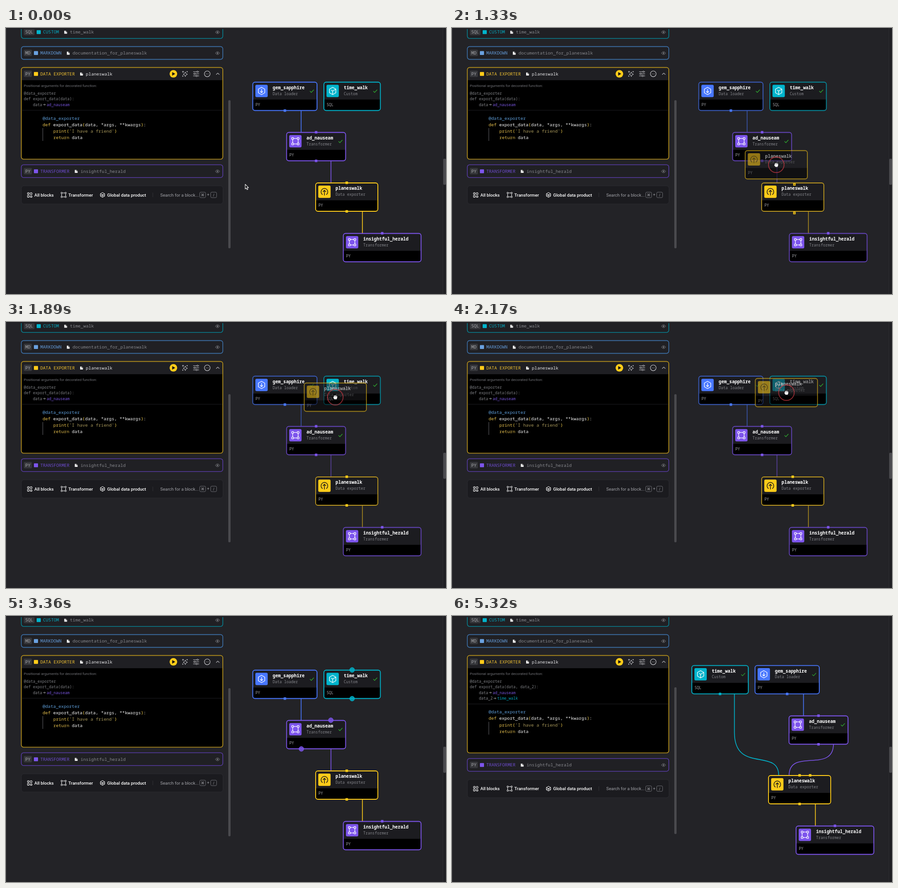
These frames come from a looping animation (962 px wide and 582 px high, 5.53 s). An HTML page with a canvas:

```html
<!DOCTYPE html>
<html lang="en">
<head>
<meta charset="utf-8">
<title>Pipeline editor</title>
<style>
html, body { margin: 0; width: 100%; height: 100%; overflow: hidden; background: #232327; }
canvas { display: block; width: 962px; height: 582px; }
</style>
</head>
<body>
<canvas id="stage" width="962" height="582"></canvas>
<script>
const ctx = document.getElementById('stage').getContext('2d');
const LOOP = 5530, STEP = 70;
const HOVER = 630, DRAG = 1190, DROP = 2520, RELAYOUT = 3570;
const MONO = '"Noto Sans Mono", "DejaVu Sans Mono", monospace';
const SANS = 'Roboto, sans-serif';
const CODE = '9.68px ' + MONO, SMALL = '8.35px ' + MONO, TITLE = 'bold 9.7px ' + MONO;
const C = { blue: '#4877ff', teal: '#00b4cc', purple: '#7d55ec', yellow: '#ffcc19', sky: '#6aa1e0',
  white: '#fff', gray: '#87888d', green: '#2fa82f' };
const BORDER_DIM = { [C.blue]: '#3a5cbc', [C.teal]: '#078899', [C.purple]: '#6344b8', [C.yellow]: '#b8941f' };

const NODES = {
  load: { w: 140.5, color: C.blue, title: 'gem_sapphire', sub: 'Data loader', lang: 'PY', icon: 'load', done: true },
  walk: { w: 123.5, color: C.teal, title: 'time_walk', sub: 'Custom', lang: 'SQL', icon: 'cube', done: true },
  trans: { w: 129, color: C.purple, title: 'ad_nauseam', sub: 'Transformer', lang: 'PY', icon: 'frame', done: true },
  out: { w: 136, color: C.yellow, title: 'planeswalk', sub: 'Data exporter', lang: 'PY', icon: 'export' },
  last: { w: 170, color: C.purple, title: 'insightful_herald', sub: 'Transformer', lang: 'PY', icon: 'frame' }
};
const BEFORE = { load: [539.5, 118.5], walk: [695, 118.5], trans: [613.5, 228.5], out: [677, 339], last: [737.5, 449.5] };
const AFTER = { load: [662.5, 108.3], walk: [524.3, 108.3], trans: [736.8, 218.5], out: [692, 349], last: [752.3, 459.5] };
const NODE_H = 62;

// time, x, y
const CURSOR = [[0, 523, 342], [140, 523, 342], [560, 676, 362], [770, 715, 368.5], [1120, 715, 368.5],
  [1540, 703, 230], [1890, 720, 164.5], [2240, 734, 152], [2450, 734, 152], [2660, 630.5, 341], [3010, 560, 343]];

const clamp = (v, a = 0, b = 1) => Math.max(a, Math.min(b, v));

function cursorAt(t) {
  for (let i = 1; i < CURSOR.length; i++) {
    const [t0, x0, y0] = CURSOR[i - 1], [t1, x1, y1] = CURSOR[i];
    if (t <= t1) {
      const k = (t - t0) / (t1 - t0);
      return [x0 + (x1 - x0) * k, y0 + (y1 - y0) * k];
    }
  }
  return CURSOR[CURSOR.length - 1].slice(1);
}

function text(str, x, y, font, color) {
  ctx.font = font;
  ctx.fillStyle = color;
  ctx.fillText(str, x, y);
}
function rect(x, y, w, h, color) {
  ctx.fillStyle = color;
  ctx.fillRect(x, y, w, h);
}
function round(x, y, w, h, r, fill, stroke, lw = 1) {
  ctx.beginPath();
  ctx.roundRect(x, y, w, h, r);
  if (fill) { ctx.fillStyle = fill; ctx.fill(); }
  if (stroke) { ctx.strokeStyle = stroke; ctx.lineWidth = lw; ctx.stroke(); }
}
function path(d, stroke, lw = 1, fill) {
  const p = new Path2D(d);
  if (fill) { ctx.fillStyle = fill; ctx.fill(p); }
  if (stroke) { ctx.strokeStyle = stroke; ctx.lineWidth = lw; ctx.stroke(p); }
}
function circle(x, y, r, fill, stroke, lw = 1) {
  ctx.beginPath();
  ctx.arc(x, y, r, 0, 7);
  if (fill) { ctx.fillStyle = fill; ctx.fill(); }
  if (stroke) { ctx.strokeStyle = stroke; ctx.lineWidth = lw; ctx.stroke(); }
}
function at(x, y, draw, scale = 1) {
  ctx.save();
  ctx.translate(x, y);
  ctx.scale(scale, scale);
  draw();
  ctx.restore();
}

// Icons are centred on the origin.
const ICONS = {
  load(c) {
    path('M0-8L7-4V4L0 8L-7 4V-4Z', c, 1.3);
    path('M0-4V3.5M-3 .8L0 3.8L3 .8', c, 1.3);
  },
  cube(c) {
    path('M0-8L7-4V4L0 8L-7 4V-4Z', c, 1.3);
    path('M0 8V0L7-4M0 0L-3.5-2', c, 1.3);
  },
  frame(c) {
    path('M-4-6H4M-4 6H4M-6-4V4M6-4V4', c, 1.3);
    for (const x of [-6, 6]) for (const y of [-6, 6]) round(x - 2, y - 2, 4, 4, 1, null, c, 1.3);
  },
  export(c) {
    path('M-4 6.5A7.4 7.4 0 1 1 4 6.5', c, 1.4);
    path('M0 8V-3M-3.4 .2L0-3.2L3.4 .2', c, 1.4);
  },
  eye() {
    path('M-4.7 0Q0-6.4 4.7 0Q0 6.4-4.7 0Z', '#77787d', 1);
    circle(0, 0, 1.7, '#77787d');
  },
  file() {
    path('M-3-3.3H.6L3.2-.6V3.3H-3Z', null, 1, '#eee');
    path('M.6-3.3V-.6H3.2', '#333', .8);
  },
  blocks(c) {
    round(-5, -5, 3.6, 3.6, 1, null, c, 1.1);
    round(-5, .6, 3.6, 4.6, 1, null, c, 1.1);
    round(1, -5, 3.8, 4.6, 1.6, null, c, 1.1);
    round(1, 2, 3.8, 3.2, 1, null, c, 1.1);
  },
  product(c) {
    path('M0-5.2L4.7-2.6V2.6L0 5.2L-4.7 2.6V-2.6ZM-4.7-2.6L0 0L4.7-2.6M0 0V5.2M-4.7 2.6L0 0L4.7 2.6', c, 1);
  },
  sparkle(c) {
    path('M1-4Q1.6.4 6 1Q1.6 1.6 1 6Q.4 1.6-4 1Q.4.4 1-4Z', c, 1);
    path('M-4-6.5V-2.5M-6-4.5H-2M5-6V-3.4M3.7-4.7H6.3M-4.5 3.6V6.2M-5.8 4.9H-3.2', c, 1);
  },
  sliders(c) {
    path('M-6.5-4.5H6.5M-6.5 0H6.5M-6.5 4.5H6.5', c, 1);
    for (const [x, y] of [[3, -4.5], [-3, 0], [1, 4.5]]) round(x - 1.5, y - 1.4, 3, 2.8, 1, '#1f1f23', c, 1);
  }
};
const icon = (name, x, y, color = C.white, scale = 1) => at(x, y, () => ICONS[name](color), scale);

function blockHeader(y, b) {
  const n = b.lang.length, x = 61 + (n - 2) * 6;
  round(39, y - 7, 5.8 * n + 6, 14, 2, '#36373b');
  text(b.lang, 42, y + 3.6, CODE, '#a5a6aa');
  round(x, y - 4, 9, 8.5, 1, b.square);
  text(b.label, x + 14, y + 3.6, CODE, b.color);
  const end = x + 14 + b.label.length * 5.81;
  icon('file', end + 14.5, y + .5);
  text(b.name, end + 24, y + 3.6, CODE, b.nameColor || C.gray);
}
function collapsedBlock(y, b) {
  round(33.5, y - 14, 440.5, 28, 5, '#202024', b.border, 1.6);
  blockHeader(y, b);
  icon('eye', 462.5, y + .4);
}

// parts: [text, color] runs on one line
function codeLine(x, y, font, parts) {
  for (const [str, color] of parts) {
    text(str, x, y, font, color);
    x += ctx.measureText(str).width;
  }
}
function argument(y, name, source, color) {
  text(name, 59, y, SMALL, C.gray);
  const x = 61.5 + name.length * 5.01;
  path(`M${x - .5} ${y - 3}h5m-2-2l2 2l-2 2`, '#aaa', .9);
  text(source, x + 7.5, y, SMALL, color);
}

function exporterBlock(linked) {
  const dy = linked ? 12.5 : 0, y = 100.3;
  round(33.5, 86.3, 440.5, 200.7 + dy, 5, '#000');
  round(33.5, 86.3, 440.5, 28, [5, 5, 0, 0], '#1f1f23');
  round(33.5, 86.3, 440.5, 200.7 + dy, 5, null, '#b48f1c', 1.7);
  blockHeader(y, { lang: 'PY', square: C.yellow, color: '#f1c232', label: 'DATA EXPORTER', name: 'planeswalk', nameColor: '#e4e4e6' });
  circle(366, y, 8.3, C.yellow);
  path('M363.4 96.4L370 100.3L363.4 104.2Z', null, 1, '#111');
  icon('sparkle', 391, y, '#c8c8cc');
  icon('sliders', 415.7, y, '#c8c8cc');
  circle(440, y, 6.3, null, '#c8c8cc', 1.1);
  for (const x of [-2.4, 0, 2.4]) circle(440 + x, y, .6, '#c8c8cc');
  path('M459.5 102L463 98.6L466.5 102', '#b5b5ba', 1.1);

  text('Positional arguments for decorated function:', 39, 128.7, '8.05px ' + SANS, '#707176');
  text('@data_exporter', 39, 146, SMALL, '#7f8085');
  text(linked ? 'def export_data(data, data_2):' : 'def export_data(data):', 39, 158, SMALL, '#7f8085');
  argument(170.7, 'data', 'ad_nauseam', '#7955e0');
  if (linked) argument(183.2, 'data_2', 'time_walk', '#05a5bb');
  rect(34.5, 179.5 + dy, 438.5, 1, '#1e1e22');

  const key = '#e6c04d', par = '#ffd84d';
  text('@data_exporter', 80, 200.7 + dy, CODE, '#5f9fdb');
  codeLine(80, 214.9 + dy, CODE, [['def ', key], ['export_data', C.white], ['(', par], ['data, *args, **kwargs', '#f2f2f2'], [')', par], [':', '#f2f2f2']]);
  codeLine(103.4, 229.1 + dy, CODE, [['print', key], ['(', par], ["'I have a friend'", '#a8985a'], [')', par]]);
  codeLine(103.4, 243.3 + dy, CODE, [['return ', key], ['data', '#f2f2f2']]);
  rect(80, 219 + dy, 1, 28, '#606064');
}

function toolbar(dy) {
  const y = 365.2 + dy, bold = '500 9.68px ' + SANS, base = y + 3.3;
  round(33.5, 345.2 + dy, 441, 40, 6, '#1b1b1f', '#2c2c31', 1);
  icon('blocks', 52, y);
  text('All blocks', 62, base, bold, C.white);
  icon('frame', 126, y, C.white, .72);
  text('Transformer', 136.3, base, bold, C.white);
  icon('product', 211, y);
  text('Global data product', 221.3, base, bold, C.white);
  rect(320.5, y - 5, 1, 10, '#333338');
  text('Search for a block...', 337.3, base, '9.55px ' + SANS, '#a2a3a8');
  for (const [x, s] of [[423.5, '⌘'], [447.5, '/']]) {
    round(x, y - 6, 13, 12, 2.5, null, '#6b6c71', 1);
    ctx.textAlign = 'center';
    text(s, x + 6.5, y + 2.8, '7.5px "DejaVu Sans", sans-serif', '#a2a3a8');
  }
  text('+', 442, y + 3, '9px ' + SANS, '#a2a3a8');
  ctx.textAlign = 'left';
}

function leftPanel(linked) {
  const dy = linked ? 12.5 : 0;
  collapsedBlock(8.8, { lang: 'SQL', square: C.teal, color: '#05a9bf', border: '#087d8d', label: 'CUSTOM', name: 'time_walk' });
  collapsedBlock(54.6, { lang: 'MD', square: C.sky, color: '#6399d6', border: '#3c6fa6', label: 'MARKDOWN', name: 'documentation_for_planeswalk' });
  exporterBlock(linked);
  collapsedBlock(313.2 + dy, { lang: 'PY', square: C.purple, color: '#6c4bcc', border: '#553b9f', label: 'TRANSFORMER', name: 'insightful_herald' });
  toolbar(dy);
  const top = linked ? 156 : 158, end = linked ? 477 : 482;
  round(486, top, 5, end - top, 2, '#4a4a4e');
}

function node(n, x, y, dim) {
  round(x, y, n.w, 38, [5, 5, 0, 0], '#1c1c20');
  round(x, y + 38, n.w, NODE_H - 38, [0, 0, 5, 5], '#000');
  round(x, y, n.w, NODE_H, 5, null, dim ? BORDER_DIM[n.color] : n.color, 1.8);
  round(x + 5.7, y + 5.7, 27, 27, 3, n.color);
  icon(n.icon, x + 19.2, y + 19.2, n.icon === 'export' ? '#15151a' : C.white);
  text(n.title, x + 43.6, y + 15.3, TITLE, C.white);
  text(n.sub, x + 43.6, y + 28, SMALL, '#85868b');
  text(n.lang, x + 6, y + 52, SMALL, '#a2a3a8');
  if (n.done) path(`M${x + n.w - 15.5} ${y + 19.5}l3 3l5.5-6`, C.green, 1.2);
}

function square(x, y, color, hollow) {
  rect(x - 2.7, y - 2.7, 5.4, 5.4, color);
  if (hollow) rect(x - 1.2, y - 1.2, 2.4, 2.4, '#6b5a1c');
}
function bigPort(x, y, color) {
  ctx.globalAlpha = .8;
  circle(x, y, 5.4, color);
  ctx.globalAlpha = 1;
  circle(x, y, 5.2, null, color, 1);
}
// Enlarged ports slide into place from the lower right.
function bigPorts(n, [x, y], start, t, inset) {
  const off = 5 * clamp(1 - (t - start) / 500);
  bigPort(x + n.w * (1 - inset) + off, y - .5 + off, n.color);
  bigPort(x + n.w * inset + off, y + NODE_H + .3 + off, n.color);
}
function smallPorts(n, [x, y], top, bottom, off = 0) {
  const cx = x + n.w / 2 + off;
  if (top) square(cx, y - .4 + off, n.color, off > 0);
  if (bottom) square(cx, y + NODE_H + .2 + off, n.color, off > 0);
}

function edges(linked, dim) {
  ctx.globalAlpha = dim ? .6 : 1;
  if (linked) {
    path('M768.5 170V218', C.blue, 1.6);
    path('M617.5 170V255C617.5 345 714.3 288 714.3 349', C.teal, 1.6);
    path('M834 280C834 345 737 288 737 349', C.purple, 1.6);
    path('M794.5 411V459', C.yellow, 1.6);
  } else {
    path('M645.3 180V228', C.blue, 1.6);
    path('M710.5 290V339', C.purple, 1.6);
    path('M779.3 401V449', C.yellow, 1.6);
  }
  ctx.globalAlpha = 1;
}

function ports(t, pos, linked) {
  const { load, walk, trans, out, last } = NODES;
  const hover = t >= HOVER && t < DRAG, dropped = t >= DROP && !linked;
  smallPorts(load, pos.load, false, true);
  smallPorts(last, pos.last, true, false);
  if (linked) {
    smallPorts(walk, pos.walk, false, true);
    square(pos.out[0] + 91, pos.out[1] - .4, C.yellow);
  }
  if (dropped) {
    bigPorts(walk, pos.walk, 2360, t, .5);
    bigPorts(trans, pos.trans, 2660, t, .25);
  } else smallPorts(trans, pos.trans, true, true);
  if (hover) bigPorts(out, pos.out, HOVER - 280, t, .25);
  else smallPorts(out, pos.out, true, true, t >= DRAG && t < DROP ? 5 * clamp(1 - (t - DRAG) / 500) : 0);
}

function cursor(t, x, y) {
  const outline = '#16161a';
  if (t >= 840 && t < DROP) {
    const k = clamp((t - 770) / 280);
    ctx.globalAlpha = .7 * k * k * clamp((DROP - t) / 140);
    circle(x, y, 6 + 11 * k, null, '#c93a44', 1.8);
  }
  ctx.globalAlpha = clamp((3290 - t) / 280);
  at(x, y, () => {
    if (t >= DRAG && t < DROP) {
      path('M-3.5-1V-3Q-2.6-4.6-1.6-3.4Q-.6-5.2.5-3.7Q1.6-4.8 2.5-3.2Q4.4-3.6 4.4-1.5V1.2L3 5H-2L-4.6 1.5Q-5-.4-3.5-1Z', outline, .8, '#fff');
      path('M-1.4-2.8V-.8M.6-3V-.8M2.5-2.6V-.8', outline, .6);
    } else if (t >= HOVER && t < DRAG) {
      path('M-1.8 2V-3Q-.9-4.6 0-3V-.2Q1-1.2 1.8 0Q2.8-.7 3.5.5Q4.8.3 4.9 1.7V4L3.6 7.2H-1L-3.8 3.2Q-4.1 1.2-1.8 2.6Z', outline, .8, '#fff');
    } else path('M0 0V10.2L2.3 8L4 11.8L5.8 11L4.2 7.4H7.3Z', '#f2f2f2', 1.1, '#0c0c0e');
  });
  ctx.globalAlpha = 1;
}

function draw(t) {
  const linked = t >= RELAYOUT, dragging = t >= DRAG && t < DROP;
  const pos = linked ? AFTER : BEFORE, [cx, cy] = cursorAt(t);
  ctx.lineJoin = 'round';
  rect(0, 0, 962, 582, '#232327');
  leftPanel(linked);
  rect(0, 0, 962, 2.5, '#1e1e22');
  rect(0, 0, 1, 582, '#2d2d31');
  rect(955, 0, 7, 582, '#1f1f23');
  rect(955, 0, 1, 582, '#2c2c30');
  round(956, 286, 6, 57, 2, '#4a4a4e');

  edges(linked, dragging);
  for (const id in NODES) node(NODES[id], ...pos[id], dragging);
  ports(t, pos, linked);
  if (dragging) {
    ctx.globalAlpha = .55;
    node(NODES.out, cx - 68, cy - 31, false);
    ctx.globalAlpha = 1;
  }
  if (t < 3290) cursor(t, cx, cy);
}

const began = performance.now();
function tick() {
  const t = (performance.now() - began) % LOOP;
  draw(Math.floor(t / STEP) * STEP);
  requestAnimationFrame(tick);
}
tick();
</script>
</body>
</html>
```
